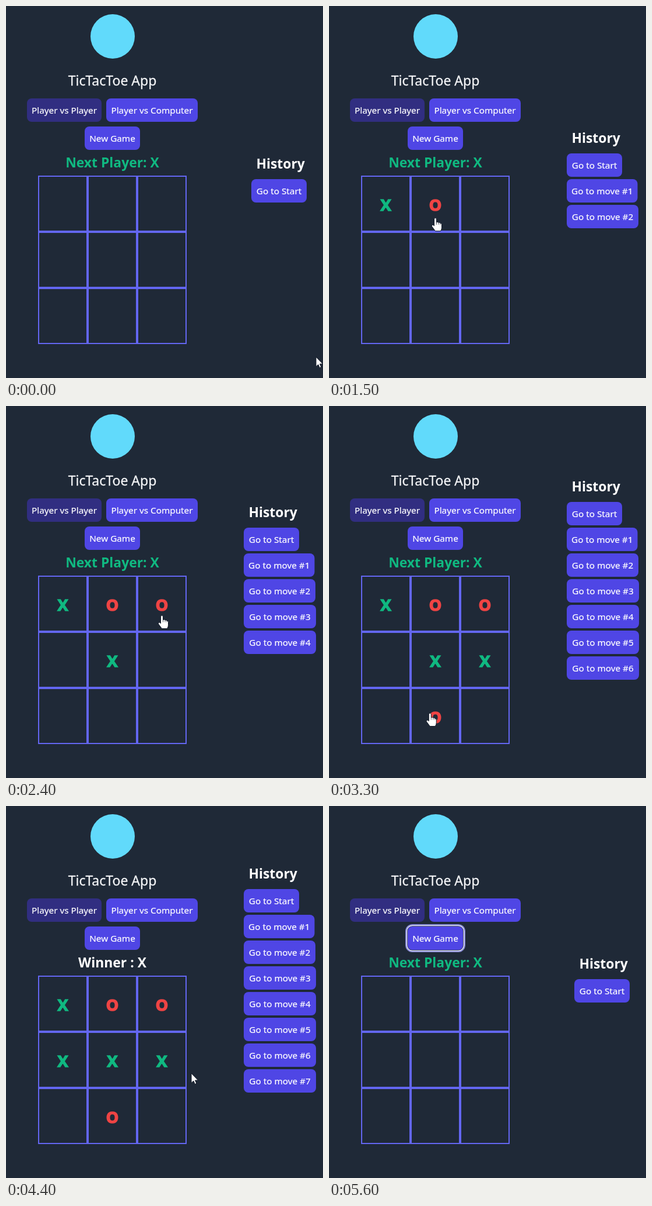
Write an HTML page that moves like this. It is 544 px wide and 636 px high and loops after 5700 ms.

```html
<!DOCTYPE html>
<html lang="en">
<head>
<meta charset="utf-8">
<title>TicTacToe App</title>
<style>
  html, body { margin: 0; width: 100%; height: 100%; overflow: hidden; background: #1f2937; }
  svg { display: block; width: 544px; height: 636px; }
  text { font-family: "Segoe UI", "Open Sans", "Noto Sans", sans-serif; }
  .title { font-size: 23px; font-weight: 500; stroke-width: .3; }
  .head { font-size: 22.9px; font-weight: 700; }
  .label { font-size: 15.3px; font-weight: 500; stroke-width: .2; }
  .mark { font-size: 27px; font-weight: 800; stroke-width: 1.6; }
  .mid { text-anchor: middle; }
</style>
</head>
<body>
<svg id="stage" viewBox="0 0 544 636"></svg>
<script>
const LOOP = 5700, STEP = 100, RESET = 5200;
const GREEN = '#10b981', RED = '#ef4444', INDIGO = '#4f46e5', DIM = '#312e81';
const CELL_W = 85, CELL_H = 96, LEFT = 55, TOP = 290;
const stage = document.getElementById('stage');

const order = [0, 1, 4, 2, 5, 7, 3];
const clickTime = i => 950 + 460 * i;
const corner = cell => [LEFT + cell % 3 * CELL_W, TOP + Math.floor(cell / 3) * CELL_H];
const color = turn => turn % 2 ? RED : GREEN;
const letter = turn => turn % 2 ? 'O' : 'X';

// Pointer path as [time, x, y]: in, every clicked cell, out, New Game, away
const path = [
  [0, 532, 600], [800, 106, 332],
  ...order.map((cell, i) => {
    const [x, y] = corner(cell);
    return [clickTime(i), x + CELL_W / 2, y + 54];
  }),
  [4400, 318, 457], [RESET, 190, 228], [5500, 282, 268]
];

function pointerAt(t) {
  const i = path.findIndex(k => k[0] >= t);
  if (i < 1) return i < 0 ? null : path[0].slice(1);
  const [t0, x0, y0] = path[i - 1], [t1, x1, y1] = path[i];
  const p = (t - t0) / (t1 - t0);
  return [x0 + (x1 - x0) * p, y0 + (y1 - y0) * p];
}

const text = (s, x, y, cls, fill = '#fff') =>
  `<text class="${cls}" x="${x}" y="${y}" fill="${fill}" stroke="${fill}" stroke-width="0">${s}</text>`;

const rect = (x, y, w, h, attrs) =>
  `<rect x="${x}" y="${y}" width="${w}" height="${h}" ${attrs}/>`;

const button = (s, x, y, w, fill = INDIGO) =>
  rect(x, y, w, 40, `rx="8" fill="${fill}"`) + text(s, x + w / 2, y + 26, 'label mid');

function board(n) {
  let out = '';
  for (let cell = 0; cell < 9; cell++) {
    const [x, y] = corner(cell), turn = order.indexOf(cell);
    out += rect(x + 1, y + 1, CELL_W - 2, CELL_H - 2, 'fill="none" stroke="#6366f1" stroke-width="2"');
    if (turn >= 0 && turn < n) out += text(letter(turn), x + 42.5, y + 59.5, 'mark mid', color(turn));
  }
  return out;
}

function history(n) {
  const left = n ? 408 : 421, top = 296 - 22 * n;
  let out = text('History', left + 8.5, top - 18, 'head') + button('Go to Start', left, top, 95);
  for (let i = 1; i <= n; i++)
    out += button('Go to move #' + i, left, top + 44 * i, Math.min(120 + i * 1.5, 124));
  return out;
}

const status = n => n === order.length
  ? text('Winner : X', 182.5, 276, 'head mid')
  : text('Next Player: ' + letter(n), 182.5, 276, 'head mid', color(n));

const focusRing =
  rect(132, 203, 101, 46, 'rx="11" fill="none" stroke="#8688d2" stroke-width="2"') +
  rect(133.5, 204.5, 98, 43, 'rx="9.5" fill="none" stroke="#e0e2fc" stroke-width="1.6"');

const ARROW = 'M0 0V16.5L3.8 13L6.3 18.5L8.9 17.3L6.5 12H11.6Z';
const HAND = 'M-2 1Q0-2 2 1V7Q4 5.8 5.5 7.5Q7.5 6.8 8.5 8.7Q11 8 11 11V16Q11 19 9 22H0L-6 14Q-7 11-4 11.5L-2 13Z';
const FINGERS = 'M2 7V11M5.5 8V11M8.5 9V11';

function pointer(t) {
  const at = pointerAt(t);
  if (!at) return '';
  const [x, y] = at;
  const inside = (l, top, w, h) => x > l && x < l + w && y > top && y < top + h;
  const hand = inside(LEFT, TOP, 3 * CELL_W, 3 * CELL_H) || inside(135, 206, 95, 40);
  return `<g transform="translate(${x} ${y})" stroke="#111827" stroke-linejoin="round">` +
    `<path d="${hand ? HAND : ARROW}" fill="#fff"/>` +
    (hand ? `<path d="${FINGERS}" stroke-width=".7"/>` : '') + '</g>';
}

function draw(t) {
  const n = t < RESET ? order.filter((_, i) => clickTime(i) <= t).length : 0;
  stage.innerHTML =
    '<circle cx="183" cy="52" r="38" fill="#61dafb"/>' +
    text('TicTacToe App', 182.5, 136, 'title mid', '#f3f4f6') +
    button('Player vs Player', 36, 158, 128, DIM) +
    button('Player vs Computer', 172, 158, 157) +
    button('New Game', 135, 206, 95) +
    (t >= RESET ? focusRing : '') +
    status(n) + board(n) + history(n) + pointer(t);
}

const start = performance.now();
let shown = -1;
function tick() {
  const t = Math.floor((performance.now() - start) % LOOP / STEP) * STEP;
  if (t !== shown) draw(shown = t);
  requestAnimationFrame(tick);
}
tick();
</script>
</body>
</html>
```
